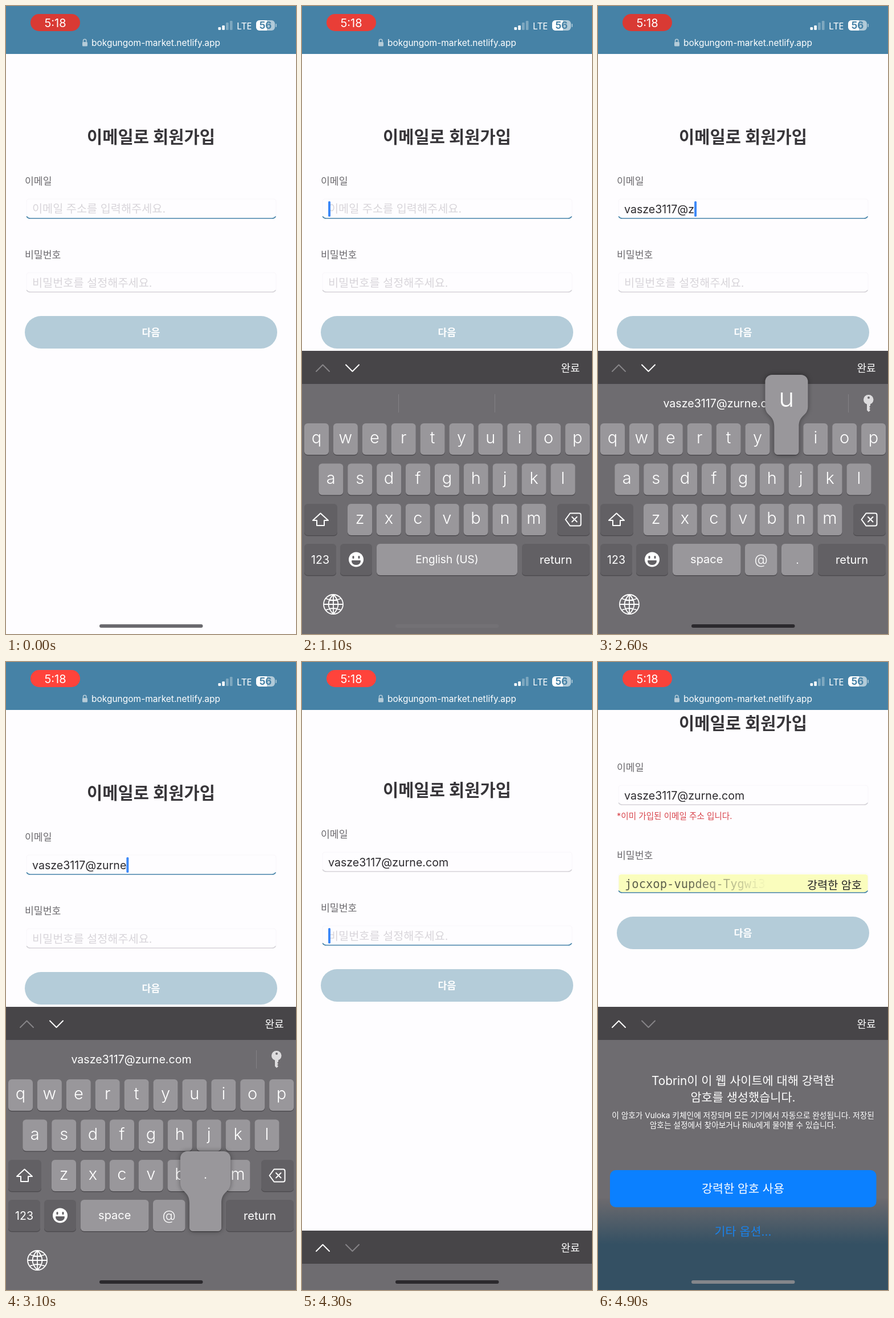
These frames come from a looping animation (509x1100 px, 5 s). An HTML page with a canvas:

```html
<!DOCTYPE html>
<html lang="ko">
<head>
<meta charset="utf-8">
<style>
  html, body { margin: 0; height: 100%; overflow: hidden; }
  canvas { display: block; }
</style>
</head>
<body>
<canvas id="stage" width="509" height="1100"></canvas>
<script>
const g = document.getElementById('stage').getContext('2d');
const LOOP = 5000, STEP = 100;
const SANS = 'Inter, "Noto Sans CJK KR", "Noto Sans CJK", sans-serif';
const MONO = '"DejaVu Sans Mono", monospace';
const HEADER = '#4682a6', PAGE = '#fefdff', KEY = '#99979b', DARK_KEY = '#626064';
const EMAIL = 'vasze3117@zurne.com', CHARS = [...EMAIL];

const LAYOUTS = {
  english: ['qwertyuiop', 'asdfghjkl', 'zxcvbnm'],
  korean: ['ㅂㅈㄷㄱㅅㅛㅕㅑㅐㅔ', 'ㅁㄴㅇㄹㅎㅗㅓㅏㅣ', 'ㅋㅌㅊㅍㅠㅜㅡ'],
  digits: ['1234567890', '$!~&=#[]', '._-+'],
};

// Pauses after the @ sign and before the dot
const typedAt = i => 1400 + 100 * (i + (i > 9 ? 2 : 0) + (i > 14 ? 1 : 0));

// Critically damped spring from 0 to 1
function spring(t, start) {
  const x = Math.max(0, t - start) * 0.0217;
  return 1 - (1 + x) * Math.exp(-x);
}

function box(x, y, w, h, r, color) {
  g.fillStyle = color;
  g.beginPath();
  g.roundRect(x, y, w, h, r);
  g.fill();
}

function stroke(path, color, width) {
  g.strokeStyle = color;
  g.lineWidth = width;
  g.lineJoin = g.lineCap = 'round';
  g.stroke(new Path2D(path));
}

// y is the middle of the capital height
function text(s, x, y, size, color = '#fff', align = 'left', weight = 400, family = SANS) {
  g.font = `${weight} ${size}px ${family}`;
  g.textAlign = align;
  g.fillStyle = color;
  g.fillText(s, x, y + size * 0.363);
}

function drawHeader(t) {
  box(0, 0, 509, 84, 0, HEADER);
  const dim = Math.max(0, Math.cos(t / 1300 * 2 * Math.PI));
  box(43, 14, 87, 30, 15, `rgb(${255 - 38 * dim}, ${67 - 9 * dim}, ${59 - 7 * dim})`);
  text('5:18', 86.5, 29.5, 20, '#fff', 'center');
  [5, 8, 13, 16].forEach((h, i) =>
    box(372.5 + i * 6.8, 42 - h, 4.6, h, 1.2, i < 2 ? '#fff' : '#7ea8c0'));
  text('LTE', 405, 35, 16.3, '#fff', 'left', 500, '"Noto Sans", sans-serif');
  box(439, 25, 33, 18, 6, '#b1cad8');
  box(439, 25, 19, 18, [6, 0, 0, 6], '#fff');
  box(473, 31, 2, 6, 1, '#9fbfd0');
  text('56', 455.5, 34, 17, HEADER, 'center', 700);
  stroke('M135.5 64V61a2.7 2.7 0 0 1 5.4 0V64', '#b5cbd8', 1.5);
  box(134, 63, 9, 7.5, 1.5, '#b5cbd8');
  text('bokgungom-market.netlify.app', 150, 64, 15.5);
}

function drawField(y, focused) {
  stroke(`M36 ${y - 3}V${y - 29}q0 -5 5 -5H469q5 0 5 5V${y - 3}`, '#f8f6fa', 1);
  stroke(`M36.5 ${y - 3}q2 3 6 3H467q4 0 6 -3`, focused ? '#4583a9' : '#d6d4d9', 1.6);
}

function drawForm(t, typed) {
  const second = t >= 3600, taken = t >= 4500, filled = t >= 4600;
  const caretColor = '#3c88f8';
  g.save();
  g.translate(0, -5 * spring(t, 3650) - 117 * spring(t, 4300));
  text('이메일로 회원가입', 254.5, 229, 29.6, '#38363a', 'center', 700);
  text('이메일', 33, 307, 17.2, '#6b696d');
  drawField(372, !second);
  if (typed) text(typed, 46, 356, 19.6, '#2c2a2e');
  else text('이메일 주소를 입력해주세요.', 46, 355, 19.7, '#d8d5da');
  if (t >= 200 && !second) {
    const width = typed ? g.measureText(typed).width : 0;
    box(46 + width, 342, 4, 27, 1.5, caretColor);
  }
  if (taken) {
    text('*이미 가입된 이메일 주소 입니다.', 33, 392, 14.6, '#d8434a');
    g.translate(0, 25);
  }
  text('비밀번호', 33, 436, 17.2, '#6b696d');
  if (filled) {
    box(36, 469, 438, 32, 5, '#fafdbd');
    const fade = g.createLinearGradient(150, 0, 298, 0);
    fade.addColorStop(0, '#5d5f4c');
    fade.addColorStop(1, '#5d5f4c00');
    text('jocxop-vupdeq-Tygwi3', 47, 486, 20.5, fade, 'left', 400, MONO);
    text('강력한 암호', 463, 488, 19.7, '#242326', 'right');
  } else {
    text('비밀번호를 설정해주세요.', 46, 485, 19.7, '#d8d5da');
    if (second) box(46, 471, 4, 27, 1.5, caretColor);
  }
  drawField(501, second);
  box(33, 543, 443, 57, 28.5, '#b4ccd9');
  text('다음', 254.5, 572, 17.3, '#fff', 'center', 700);
  g.restore();
}

function drawPopup(label, x, y, w) {
  const h = 55, top = y - 85, left = x - 16, right = x + w + 16, mid = x + w / 2;
  g.save();
  g.shadowColor = '#0006';
  g.shadowBlur = 8;
  g.fillStyle = KEY;
  g.beginPath();
  g.moveTo(mid, top);
  g.arcTo(right, top, right, y, 12);
  g.lineTo(right, y - 30);
  g.bezierCurveTo(right, y - 12, x + w, y - 16, x + w, y + 6);
  g.arcTo(x + w, y + h, x, y + h, 6);
  g.arcTo(x, y + h, x, y, 6);
  g.lineTo(x, y + 6);
  g.bezierCurveTo(x, y - 16, left, y - 12, left, y - 30);
  g.arcTo(left, top, mid, top, 12);
  g.fill();
  g.restore();
  text(label, mid, y - 46, w > 50 ? 25 : 46, '#fff', 'center', 300);
}

function drawKeys(t, pressed) {
  const digits = t >= 1800 && t < 2400;
  const korean = t >= 700 && t < 1000;
  const wide = t >= 700 && t < 1300;
  const rows = LAYOUTS[digits ? 'digits' : korean ? 'korean' : 'english'];
  let popup;

  function key(label, x, y, w, size, dy = 28, dark = false, weight = 400) {
    box(x, y + 1.5, w, 55, 6, '#4e4c50');
    box(x, y, w, 55, 6, dark ? DARK_KEY : KEY);
    text(label, x + w / 2, y + dy, size, '#fff', 'center', weight);
    if (label === pressed) popup = [label, x, y, w];
  }
  const row = (letters, x, y, w, pitch, size, dy) =>
    [...letters].forEach((c, i) => key(c, x + i * pitch, y, w, size, dy, false, 300));

  if (wide) {
    for (const x of [169, 338]) box(x, 680, 1, 32, 0, '#838185');
  } else if (t < 3600) {
    text(EMAIL, 220, 696, 19.6, '#fff', 'center');
    box(439, 680, 1, 32, 0, '#838185');
    box(466, 681, 17.5, 17, 8.5, '#dddcde');
    g.fillStyle = '#dddcde';
    g.fill(new Path2D('M472 696h6v4l-2 2 2 2-2 2 2 2-3 3-3-3z'));
    box(473, 684, 4, 4, 2, '#6e6c70');
  }

  const size = korean ? 24 : 29, dy = digits || korean ? 28.5 : 24.5;
  row(rows[0], 4, 731, 43, 50.9, size, dy);
  if (digits) {
    row(rows[1], 14, 801.5, 53, 61.1, 26, 28);
    row(rows[2], 80, 872, 81.5, 89.4, 25, 28);
  } else {
    row(rows[1], 29.3, 801.5, 43, 50.9, size, dy);
    row(rows[2], 80, 872, 43, 50.9, size, dy);
  }
  key(digits ? '#+=' : '', 4, 872, 58, 16, 28, true);
  if (!digits) stroke('M32.5 888.5L46 901H39V910H26V901H19Z', '#fff', 2);
  key('', 448, 872, 57, 0, 0, true);
  stroke('M462.5 899.5l8-11h16q3 0 3 3v16q0 3-3 3h-16zM474 895l8.5 8.5m0-8.5l-8.5 8.5', '#fff', 2);

  key(digits ? 'ABC' : '123', 4, 942, 56, digits ? 17.5 : 19.5, 28, true);
  key('', 67, 942, 56, 0, 0, true);
  box(82, 956.5, 26, 26, 13, '#fff');
  box(88.5, 963, 3, 5, 1.5, DARK_KEY);
  box(98.5, 963, 3, 5, 1.5, DARK_KEY);
  box(87, 971, 16, 8, [1, 1, 8, 8], DARK_KEY);
  if (wide) {
    key(korean ? '한국어' : 'English (US)', 131, 942, 247, 19, 27.5);
  } else {
    key('space', 131, 942, 119.5, 20, 26.5);
    key('@', 258, 942, 56.5, 24, 27, false, 300);
    key('.', 322, 942, 56, 23, 27, false, 300);
  }
  key('return', 386, 942, 119, 20, 28, true);

  stroke('M38 1048a17 17 0 1 0 34 0a17 17 0 1 0-34 0zH72M55 1031V1065' +
    'M55 1031q-17 17 0 34q17-17 0-34M42 1038q13 6 26 0M42 1058q13-6 26 0', '#fff', 1.8);
  if (popup) drawPopup(...popup);
}

function drawPasswordPanel() {
  const shade = g.createLinearGradient(0, 940, 0, 1020);
  shade.addColorStop(0, '#6c6a6e');
  shade.addColorStop(1, '#345063');
  box(0, 940, 509, 160, 0, shade);
  const centered = (s, y, size, color) => text(s, 254.5, y, size, color, 'center');
  centered('Tobrin이 이 웹 사이트에 대해 강력한', 733.5, 20.8);
  centered('암호를 생성했습니다.', 762, 20.8);
  centered('이 암호가 Vuloka 키체인에 저장되며 모든 기기에서 자동으로 완성됩니다. 저장된', 794, 13.7);
  centered('암호는 설정에서 찾아보거나 Rilu에게 물어볼 수 있습니다.', 811, 13.7);
  box(21, 890, 467.5, 65, 10, '#0b80ff');
  centered('강력한 암호 사용', 922.5, 20.7);
  centered('기타 옵션...', 997, 20.7, '#1a82ea');
}

function drawKeyboard(t, pressed) {
  const y = 1100 - 496 * spring(t, 50) + 392 * (spring(t, 3650) - spring(t, 4300));
  const second = t >= 3600;
  g.save();
  g.translate(0, y - 604);
  box(0, 604, 509, 600, 0, '#6e6c70');
  box(0, 604, 509, 58, 0, '#474548');
  stroke('M25 640L36.5 628.5 48 640', second ? '#fff' : '#868488', 2);
  stroke('M77 628.5L88.5 640 100 628.5', second ? '#868488' : '#fff', 2);
  text('완료', 487.5, 634, 18, '#fff', 'right', 500);
  if (t < 4000) drawKeys(t, pressed);
  else drawPasswordPanel();
  g.restore();
}

const INDICATOR = [[100, '#6a696e'], [700, '#908e92'], [1300, '#737175'],
  [4400, '#2b292d'], [4900, '#5d6066'], [LOOP, '#84868b']];

function draw() {
  const t = Math.floor(performance.now() % LOOP / STEP) * STEP;
  const typed = CHARS.filter((_, i) => typedAt(i) <= t).join('');
  const pressed = CHARS.find((_, i) => typedAt(i) === t + STEP);
  box(0, 0, 509, 1100, 0, PAGE);
  drawForm(t, typed);
  drawHeader(t);
  drawKeyboard(t, pressed);
  box(164, 1083, 181.5, 6, 3, INDICATOR.find(([end]) => t < end)[1]);
  requestAnimationFrame(draw);
}
draw();
</script>
</body>
</html>
```
